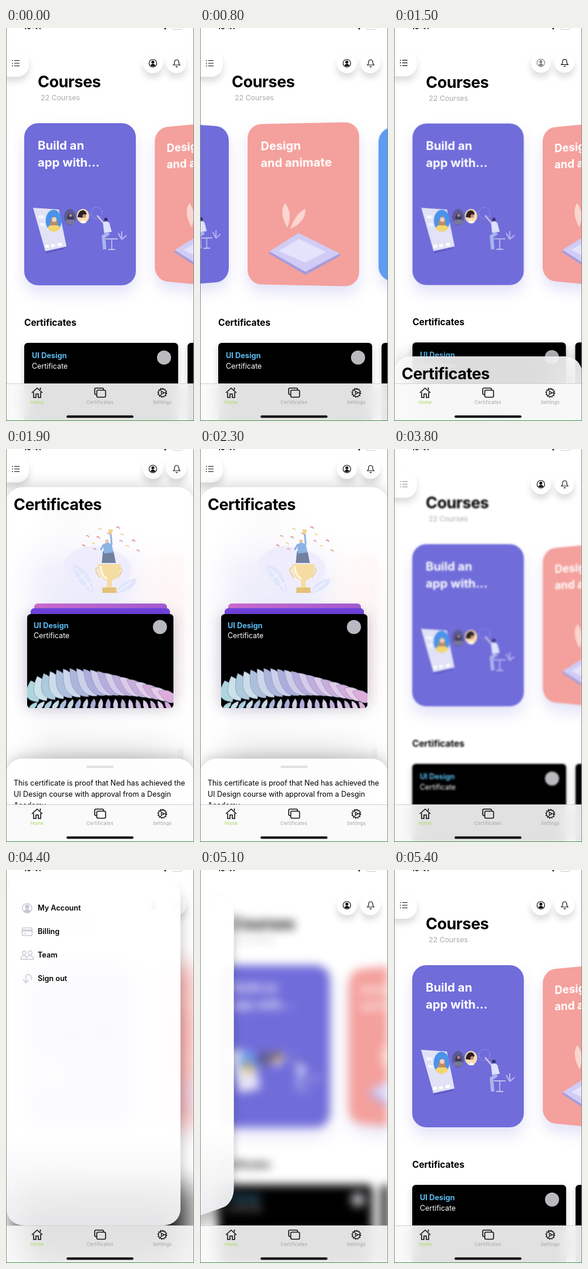
An HTML page for the animation above (5.5 s loop, 320 by 669 pixels).

```html
<!DOCTYPE html>
<html lang="en">
<head>
<meta charset="utf-8">
<title>Courses app</title>
<style>
html, body { margin: 0; height: 100%; overflow: hidden; background: #fff; }
#stage { position: relative; width: 320px; height: 669px; overflow: hidden; background: #fff; font-family: Inter, sans-serif; }
#stage div, #stage svg, p { position: absolute; }
p { margin: 0; left: calc(var(--x) * 1px); top: calc(var(--y) * 1px - 20px); line-height: 40px; white-space: nowrap; font-size: 12.4px; }
svg { overflow: visible; fill: none; left: 0; top: 0; }
.full { left: 0; top: 0; width: 320px; height: 669px; }
.title { font-size: 27px; font-weight: 700; letter-spacing: -.5px; }
.name { font-size: 12.8px; font-weight: 700; color: #5cbcf0; }
.white { color: #fff; }
#home { overflow: hidden; background: #fff; transform-origin: 160px 301px; }
.course { left: 31px; top: 162px; width: 190px; height: 276px; border-radius: 24px; color: #fff; box-shadow: 0 14px 24px #706cda30; }
.course p { font-size: 20.3px; font-weight: 700; }
.black { background: #000; border-radius: 6px; box-shadow: 0 4px 12px #0003; }
.button { background: #fff; box-shadow: 0 8px 12px #00000024; }
.round { width: 34px; height: 34px; top: 43px; border-radius: 50%; }
#panel { left: 0; width: 320px; height: 640px; border-radius: 28px; background: #ffffffdc; backdrop-filter: blur(28px); box-shadow: 0 -5px 24px #00000026; }
#sheet { left: 0; top: 527px; width: 320px; height: 180px; border-radius: 28px; background: #fffffff2; box-shadow: 0 -4px 22px #0000002e; }
#menu { left: 1px; top: 14px; width: 296px; height: 591px; border-radius: 28px; background: linear-gradient(#fffffff7 75%, #ededeff7); box-shadow: 0 20px 24px #00000040; }
#menu p { font-size: 12.6px; font-weight: 600; }
#bar { left: 0; top: 605px; width: 320px; height: 64px; box-sizing: border-box; border-top: 1px solid #d2d2d4; background: #fafafae6; backdrop-filter: blur(12px); }
#bar p { font-size: 7.6px; font-weight: 500; letter-spacing: .3px; color: #aaa; transform: translateX(-50%); }
#edge { box-sizing: border-box; border: solid #8a8a8a; border-width: 0 1px 1px; border-bottom-color: #3f9148; }
</style>
</head>
<body>
<div id="stage">
  <div id="home" class="full">
    <p class="title" style="--x:54;--y:92">Courses</p>
    <p style="--x:59;--y:118.5;color:#aaa;font-size:12.3px">22 Courses</p>

    <div class="course" style="background:#706cda">
      <p style="--x:23;--y:38">Build an</p><p style="--x:23;--y:67">app with…</p>
      <svg width="190" height="276" viewBox="31 162 190 276">
        <path d="M67 380l36-10-3 6-32 8z" fill="#5f5bc8"/>
        <path d="M46 306l44 3 13 63-36 8z" fill="#e2e2f6"/>
        <path d="M55 321l10 1M58 334l8 1" stroke="#f5f5fd" stroke-width="5"/>
        <path d="M67 372l6-1M77 371l6-1M88 369l7-1" stroke="#fff" stroke-width="5"/>
        <ellipse cx="81" cy="328" rx="13.5" ry="18.5" fill="#4a93ea"/>
        <path d="M71 341c1-9 20-9 21 0-4 7-17 8-21 0" fill="#f4d66f"/>
        <path d="M75 336c2-20 12-20 13 0z" fill="#b98d68"/>
        <circle cx="82" cy="326" r="4" fill="#f5cfba"/>
        <ellipse cx="109" cy="322" rx="10" ry="14" fill="#5c5a94"/>
        <path d="M101 331c1-9 15-9 17 0-5 5-12 5-17 0" fill="#77779c"/>
        <path d="M104 326c0-14 11-14 11 0z" fill="#3c3a58"/><circle cx="110" cy="319" r="2.5" fill="#b98c84"/>
        <ellipse cx="131" cy="320" rx="10.5" ry="12" fill="#f8dfb4"/>
        <path d="M122 322c1-14 14-15 15-5l-7 6z" fill="#2a2025"/><circle cx="133" cy="320" r="3" fill="#c78d70"/>
        <path d="M126 331q5-6 11 0-5 3-11 0" fill="#fff"/>
        <circle cx="154" cy="315" r="9.500" stroke="#a8b4ff" stroke-width=".8" stroke-dasharray="3 2"/>
        <path d="M155 319l11 13" stroke="#e9d5dc" stroke-width="2"/><circle cx="170" cy="326" r="3" fill="#34306b"/>
        <path d="M165 331q7-4 11 1l4 15-13 2z" fill="#dfe2fb"/>
        <path d="M175 349l-9 6 2 22" stroke="#a9b5ee" stroke-width="6"/>
        <path d="M170 359h20M180 360v17M174 377h12" stroke="#d9d9f6" stroke-width="1.300"/>
        <path d="M197 360l-6-11M197 360v-14M197 360l8-7" stroke="#b9b8f3" stroke-width="2"/>
      </svg>
    </div>
    <div class="course" style="background:#f4a09c">
      <p style="--x:23;--y:38">Design</p><p style="--x:23;--y:67">and animate</p>
      <svg width="190" height="276" viewBox="246 162 190 276">
        <path d="M315 340q-15-26-4-42 14 17 4 42m5 2q10-28 26-34 0 23-26 34" fill="#fbd5cf"/>
        <path d="M284 381l50-32 70 34-58 32z" fill="#d0ccf5"/>
        <path d="M284 381l62 34 58-32v4l-58 33-62-35z" fill="#a09be0"/>
        <path d="M300 380l35-21 46 22-36 18z" fill="#e4e3fc"/>
      </svg>
    </div>
    <div class="course" style="background:#5d9cf0">
      <p style="--x:23;--y:38">Prototype</p><p style="--x:23;--y:67">your app</p>
    </div>

    <p style="--x:31;--y:501.5;font-size:15.4px;font-weight:700">Certificates</p>
    <div class="black" style="left:31px;top:536px;width:262px;height:164px"></div>
    <div class="black" style="left:309px;top:536px;width:262px;height:164px"></div>
    <p class="name" style="--x:44;--y:558">UI Design</p>
    <p class="white" style="--x:44;--y:575.5">Certificate</p>
    <svg class="full"><circle cx="269" cy="561" r="12" fill="#b9b9be"/></svg>
  </div>

  <div id="buttons" class="full">
    <div class="button" style="left:-20px;top:38px;width:59px;height:45px;border-radius:0 20px 20px 0"></div>
    <div class="button round" style="left:233px"></div>
    <div class="button round" style="left:273px"></div>
    <svg class="full" stroke="#111" stroke-width="1.2">
      <path id="list" d="M10 55.5h2M10 60h2M10 64.5h2M14 55.5h9M14 60h9M14 64.5h9"/>
      <g id="profile"><circle cx="250" cy="60" r="6.500"/><circle cx="250" cy="58" r="2" fill="#111"/><path d="M246.500 63.500q3.500-4 7 0-3.500 3-7 0" fill="#111"/></g>
      <path d="M285 63q2-2 2-5 0-4 3.500-4t3.500 4q0 3 2 5zM289 65.500q1.500 1.500 3 0"/>
    </svg>
  </div>

  <div id="panel"><div style="left:0;top:-65px">
    <p class="title" style="--x:13;--y:95">Certificates</p>
    <svg id="trophy" class="full">
      <path d="M97 194q20-33 60-28 44 8 56 30 6 25-26 38-78 8-90-40" fill="#efedfd"/>
      <path d="M148 246q-31-18-34-50 33 8 34 50m40 0q6-24 34-25-1 19-34 25" fill="#e0e6fb"/>
      <path d="M118 203q20 18 27 38M122 221l12-8M132 236l12-8M192 242l22-16" stroke="#f4f5ff" stroke-width="2"/>
      <path d="M158 202q-11 0 2 17M192 202q11 0-2 17" stroke="#f0d596" stroke-width="2.500"/>
      <path d="M157 196h38q-1 25-15 28v11h6v9h-20v-9h6v-11q-14-3-15-28" fill="#f5dca2"/>
      <path d="M164 236h24v9h-24z" fill="#e5c078"/><path d="M161 199q1 17 11 22" stroke="#fff4d8" stroke-width="4"/>
      <path d="M165 174l18 0 4 20h-24z" fill="#70809f"/>
      <path d="M165 162l8-3 7 3 3 14-16 2z" fill="#8bb3e4"/><path d="M180 163l-2-21M166 163l-5 9" stroke="#8bb3e4" stroke-width="3"/>
      <circle cx="172" cy="157" r="3" fill="#ecc0a8"/><path d="M174 137h8l-2 8h-4z" fill="#f1d48e"/>
    </svg>
    <div style="left:48px;top:263px;width:226px;height:40px;border-radius:6px;background:linear-gradient(90deg,#cf6dd0,#a55ed5)"></div>
    <div style="left:42px;top:271px;width:237px;height:40px;border-radius:6px;background:#7447e5"></div>
    <div class="black" style="left:36px;top:281px;width:249px;height:160px;overflow:hidden;box-shadow:0 0 24px #1a0a4040">
      <svg id="fan" width="249" height="160" viewBox="36 281 249 160"><circle cx="262" cy="303" r="12" fill="#b9b9c4"/></svg>
    </div>
    <p class="name" style="--x:47;--y:301">UI Design</p>
    <p class="white" style="--x:47;--y:318">Certificate</p>
    <div id="sheet"></div>
    <div style="left:137px;top:539px;width:46px;height:4px;border-radius:2px;background:#e0e0e2"></div>
    <p style="--x:13;--y:568.5">This certificate is proof that Ned has achieved the</p>
    <p style="--x:13;--y:587.5">UI Design course with approval from a Desgin</p>
    <p style="--x:13;--y:606.5">Academy.</p>
  </div></div>

  <div id="menu"><div style="left:-1px;top:-14px">
    <p style="--x:54;--y:65">My Account</p>
    <p style="--x:54;--y:105">Billing</p>
    <p style="--x:54;--y:145">Team</p>
    <p style="--x:54;--y:185">Sign out</p>
    <svg class="full" stroke="#c6c8d5" stroke-width="1.4">
      <circle cx="36" cy="65" r="8"/><circle cx="36" cy="62.500" r="3" fill="#c6c8d5"/><path d="M31 70q5-6 10 0-5 4-10 0" fill="#c6c8d5"/>
      <rect x="27.500" y="98.500" width="17" height="13" rx="2"/><path d="M28 103h16" stroke-width="3"/><path d="M31 108h4"/>
      <circle cx="31" cy="141" r="3"/><circle cx="41" cy="141" r="3.500"/><path d="M25 152q0-6 6-6 3 0 4 2M34 152q1-6 7-6t6 6zM25 152h9"/>
      <path d="M29 187l5 5 5-5M34 192v-10q0-4 4-4t5 4v5"/>
    </svg>
  </div></div>

  <div id="bar"><div style="left:0;top:-606px">
    <svg class="full" stroke="#111" stroke-width="1.6">
      <path d="M44 621l9-8 9 8M47 620v9h4v-6h4v6h4v-9M58.500 612v4"/>
      <path d="M154 624h-1q-2 0-2-2v-7q0-2 2-2h11q2 0 2 2v1"/><rect x="154.500" y="616.500" width="15" height="12" rx="2"/>
      <g stroke-width="1.300"><circle cx="266" cy="621" r="6.500"/><circle cx="266" cy="621" r="7.700" stroke-dasharray="2 2.030"/>
      <circle cx="266" cy="621" r="1.800"/><path d="M262.500 615.500l2.500 4M262.500 626.500l2.500-4M268 621h4.500"/></g>
      <rect x="103" y="659.500" width="114" height="4" rx="2" fill="#000" stroke="none"/>
    </svg>
    <p style="--x:53;--y:638;color:#b2da6c">Home</p>
    <p style="--x:160;--y:638">Certificates</p>
    <p style="--x:266;--y:638">Settings</p>
  </div></div>

  <p style="--x:30;--y:-2;font-size:12px;font-weight:600">10:41</p>
  <svg class="full"><circle cx="271" cy="1" r="1.500" fill="#222"/><rect x="283" y="-6" width="17" height="8.500" rx="2.500" stroke="#ccc"/></svg>
  <div id="edge" class="full"></div>
</div>

<script>
const LOOP = 5500, STEP = 100, CARD_PITCH = 215;
const $ = id => document.getElementById(id);
const courses = document.querySelectorAll('.course');

function addPath(parent, attrs) {
  const path = document.createElementNS('http://www.w3.org/2000/svg', 'path');
  for (const key in attrs) path.setAttribute(key, attrs[key]);
  parent.append(path);
}

// Ribbon of overlapping pointed petals, plus its reflection along the lower edge
for (let row = 0; row < 2; row++) {
  for (let i = 0; i < 19; i++) {
    const u = i / 18, arch = Math.sin(Math.PI * u ** .8);
    const x = 46 + 230 * u, y = row ? 438 - 3 * arch : 413 - 15 * arch + 8 * u ** 4;
    const w = row ? 5 : 15 - 4 * u, h = row ? 10 : 19 + 10 * arch;
    addPath($('fan'), {
      d: `M0 ${-h}Q${w * 1.4} ${-h / 3} ${w / 3} ${h}Q${-w * 1.8} ${h / 2} 0 ${-h}`,
      transform: `translate(${x} ${y}) rotate(${row ? 45 - 80 * u : -12 - 52 * u})`,
      fill: `hsl(${190 + 112 * u} 42% ${i % 2 ? 86 : 77}%)`, stroke: '#8c9bb0', 'stroke-width': .7
    });
  }
}

// Confetti
for (let i = 0; i < 13; i++) {
  const angle = Math.PI * (.95 + i * 1.1 / 12), reach = 22 + i * 17 % 30;
  const x = 172 + 1.1 * reach * Math.cos(angle), y = 168 + reach * .7 * Math.sin(angle);
  addPath($('trophy'), {
    d: `M${x} ${y}q4 -3 5 2`, stroke: ['#dfa09c', '#d98a86', '#efd08c'][i % 3], 'stroke-width': 1.6
  });
}

function ease(t, from, to) {
  const x = Math.min(1, Math.max(0, (t - from) / (to - from)));
  return x * x * (3 - 2 * x);
}

// Spring with a 0.5 s response and damping 0.8, stopped on arrival
function spring(t, start) {
  const s = Math.max(0, t - start) / 1000, omega = 4 * Math.PI, wave = .6 * omega * s;
  if (wave > Math.PI / 2 + .93) return 1;
  return Math.min(1, 1 - Math.exp(-.8 * omega * s) * (Math.cos(wave) + .8 / .6 * Math.sin(wave)));
}
const toggle = (t, open, close) => spring(t, open) - spring(t, close);
const dim = pressed => pressed ? .5 : 1;

function draw(t) {
  const swipe = CARD_PITCH * (ease(t, 50, 600) - ease(t, 600, 1250));
  const panel = toggle(t, 1436, 2716);
  const back = toggle(t, 1480, 2756);
  const menu = toggle(t, 3764, 4960);

  courses.forEach((card, i) => {
    const x = CARD_PITCH * i - swipe;
    card.style.transform = `translateX(${x}px) perspective(276px) rotateY(${-x / 20}deg)`;
  });
  $('home').style.transform = `scale(${1 - .115 * back})`;
  $('home').style.filter = menu ? `blur(${20 * menu}px)` : 'none';
  $('buttons').style.transform = `translateY(${-26 * back}px)`;
  $('panel').style.top = 690 - 625 * panel + 'px';
  $('panel').style.visibility = panel ? 'visible' : 'hidden';
  $('menu').style.transform = `translateX(${-330 * (1 - menu)}px) perspective(600px) rotateY(${60 * (1 - menu)}deg)`;
  $('menu').style.visibility = menu ? 'visible' : 'hidden';
  $('profile').style.opacity = dim(t >= 1300 && t < 1700 || t >= 2600 && t < 3100);
  $('list').style.opacity = dim(t >= 3600 && t < 4000);
}

function tick() {
  draw(Math.floor(performance.now() % LOOP / STEP) * STEP);
  requestAnimationFrame(tick);
}
tick();
</script>
</body>
</html>
```
